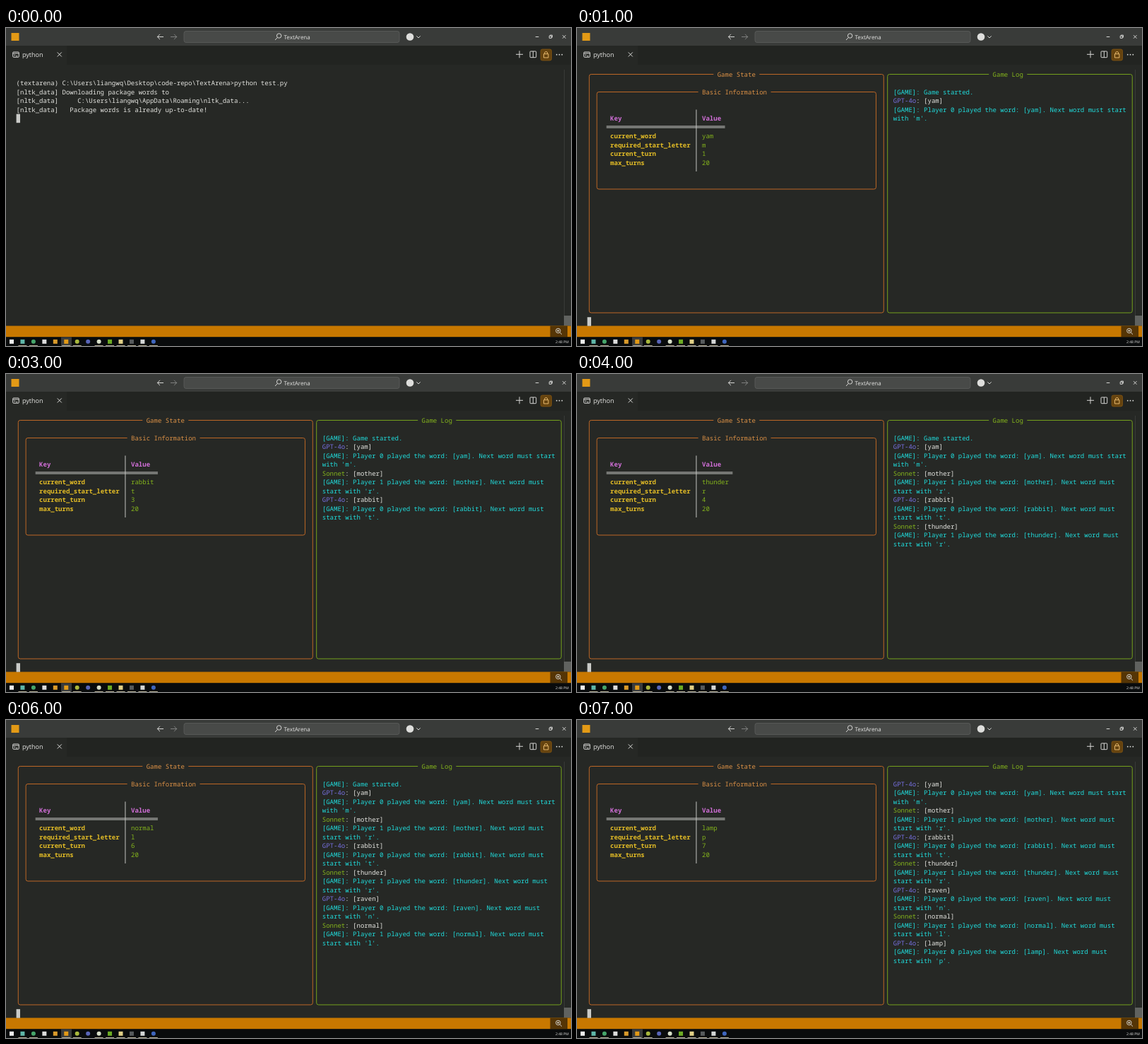
Recreate the animation shown at these times as an HTML page. Size 800 by 450 pixels, loop 8 s.

```html
<!DOCTYPE html>
<html lang="en">
<head>
<meta charset="utf-8">
<title>Word chain in a terminal</title>
<style>
  html, body { margin: 0; width: 100%; height: 100%; overflow: hidden; background: #262825; }
  svg { display: block; width: 800px; height: 450px; }
  text { white-space: pre; text-rendering: geometricPrecision; }
  .ui { font-family: "Open Sans", "Noto Sans", sans-serif; fill: #e6e6e4; }
  .term { font: 9.02px "Noto Sans Mono", "DejaVu Sans Mono", monospace; }
  .line { fill: none; stroke: #d6d6d4; stroke-width: 1; }
  .plain { fill: #e4e4e0; }
  .orange { fill: #dc9146; }
  .green { fill: #84b41c; }
  .cyan { fill: #20dcdc; font-weight: 500; }
  .violet { fill: #7770e2; }
  .key { fill: #e4bd26; font-weight: bold; }
  .head { fill: #d16fd8; font-weight: bold; }
  .rule { fill: none; stroke: #c4c5c2; stroke-width: 1; }
  .scene { visibility: hidden; animation: show 8s step-end infinite; }
  @keyframes show {
    0% { visibility: visible; }
    12.5%, 100% { visibility: hidden; }
  }
</style>
</head>
<body>
<svg viewBox="0 0 800 450" xmlns="http://www.w3.org/2000/svg">
  <rect width="800" height="450" fill="#262825"/>

  <!-- title bar -->
  <rect width="800" height="25" fill="#393b39"/>
  <rect x="7.5" y="7" width="11" height="11" fill="#e39a16"/>
  <path class="line" d="M223 12.5H214.5M218 8.8L214.3 12.5L218 16.2"/>
  <path class="line" stroke-opacity=".45" d="M233 12.5H241.5M238 8.8L241.7 12.5L238 16.2"/>
  <rect x="252" y="4.5" width="305" height="16" rx="3" fill="#484a48" stroke="#5d5f5d" stroke-width=".8"/>
  <path class="line" d="M381 17L384.3 13.5"/>
  <circle class="line" cx="386.6" cy="11" r="3.2"/>
  <text class="ui" x="393.5" y="15.6" font-size="8">TextArena</text>
  <circle cx="572" cy="12.5" r="5.3" fill="#dededc"/>
  <path class="line" d="M581.3 11.3L584 14L586.7 11.3"/>
  <g class="line" stroke-width=".8">
    <path d="M749.7 12.5H754.3M788 10.2L792.5 14.7M792.5 10.2L788 14.7"/>
    <path d="M769.2 11.2H772.3V14.3H769.2ZM770.3 11V10.1H773.4V13.2H772.5"/>
  </g>

  <!-- tab row -->
  <rect y="25" width="800" height="27" fill="#222421"/>
  <rect y="25" width="86" height="27" fill="#262825"/>
  <rect class="line" x="9.7" y="34" width="8.6" height="7.3" rx="1"/>
  <path class="line" stroke-width=".8" d="M10 36H18M11.6 37.4L12.9 38.5L11.6 39.6M14 39.7H16.4"/>
  <text class="ui" x="23" y="41.3" font-size="9">python</text>
  <path class="line" d="M72.7 34.4L78.8 40.5M78.8 34.4L72.7 40.5M722 37.3H732M727 32.3V42.3M746.3 33V41.7"/>
  <rect class="line" x="742" y="33" width="8.7" height="8.7" rx=".8"/>
  <rect x="757" y="30" width="15.5" height="16" rx="2.5" fill="#65430f" stroke="#8a5a12" stroke-width=".7"/>
  <path class="line" d="M761.4 36.7H767.9V42H761.4ZM762.7 36.5V35A2 2 0 0 1 766.6 35V36.5" style="stroke:#e8ba6e"/>
  <g fill="#dededc">
    <circle cx="779.7" cy="37.7" r=".9"/><circle cx="783.5" cy="37.7" r=".9"/><circle cx="787.3" cy="37.7" r=".9"/>
  </g>

  <!-- scroll bar and status bar -->
  <path d="M790.5 59V421" stroke="#393b38"/>
  <rect x="790" y="407" width="10" height="14.5" fill="#60625f"/>
  <rect y="421.5" width="800" height="16" fill="#c87800"/>
  <rect x="770.5" y="421.5" width="24.5" height="16" fill="#553505"/>
  <circle class="line" cx="781.8" cy="428.4" r="3.2"/>
  <path class="line" d="M784.2 430.8L787 433.6M780.2 428.4H783.4M781.8 426.8V430"/>

  <!-- taskbar -->
  <rect y="437.3" width="800" height="12.7" fill="#090b0c"/>
  <rect x="78" y="437.3" width="15" height="12.7" fill="#393b3c"/>
  <g id="dock"></g>
  <text class="ui" x="778" y="445.6" font-size="5">2:48 PM</text>

  <g id="screen" class="term"></g>
</svg>

<script>
const X0 = 14.6, Y0 = 65.5, CW = 5.415, RH = 12.5, LOG_COL = 80, LOG_WIDTH = 61, LOG_SIZE = 14;
const colX = c => X0 + c * CW;
const midX = c => colX(c + .5);
const rowY = r => Y0 + r * RH;

const esc = s => s.replace(/&/g, '&amp;').replace(/</g, '&lt;').replace(/>/g, '&gt;');
const put = (col, row, text, cls = 'plain') =>
  `<text class="${cls}" x="${colX(col)}" y="${rowY(row) + 3.1}">${esc(text)}</text>`;
const cursor = row =>
  `<rect x="${X0}" y="${rowY(row) - 6.3}" width="${CW}" height="${RH}" fill="#cacbc8"/>`;

// Rounded panel whose top edge opens around the title.
function panel(c1, c2, r1, r2, title, titleCol, stroke, cls) {
  const l = midX(c1), r = midX(c2), t = rowY(r1), b = rowY(r2), k = 2.8;
  const path = `M${colX(titleCol - 1)} ${t}H${l + k}Q${l} ${t} ${l} ${t + k}V${b - k}Q${l} ${b} ${l + k} ${b}` +
    `H${r - k}Q${r} ${b} ${r} ${b - k}V${t + k}Q${r} ${t} ${r - k} ${t}H${colX(titleCol + title.length + 1)}`;
  return `<path d="${path}" fill="none" stroke="${stroke}"/>` + put(titleCol, r1, title, cls);
}

function wrap(text) {
  const lines = [''];
  for (const word of text.split(' ')) {
    const last = lines[lines.length - 1];
    const next = last ? last + ' ' + word : word;
    if (next.length > LOG_WIDTH) lines.push(word);
    else lines[lines.length - 1] = next;
  }
  return lines;
}

const words = ['yam', 'mother', 'rabbit', 'thunder', 'raven', 'normal', 'lamp'];
const players = [['GPT-4o', 'violet'], ['Sonnet', 'green']];

function table(turn) {
  const word = words[turn - 1];
  const end = colX(31 + Math.max(5, word.length));
  const rows = [['current_word', word], ['required_start_letter', word.slice(-1)],
    ['current_turn', String(turn)], ['max_turns', '20']];
  return put(6, 5, 'Key', 'head') + put(30, 5, 'Value', 'head') +
    `<path class="rule" d="M${midX(28)} ${rowY(4)}V${rowY(11)}M${colX(5)} ${rowY(6) - 1.5}H${end}M${colX(5)} ${rowY(6) + .5}H${end}"/>` +
    rows.map(([k, v], i) => put(6, 7 + i, k, 'key') + put(30, 7 + i, v, 'green')).join('');
}

function gameLog(turn) {
  const entries = [{ text: '[GAME]: Game started.' }];
  words.slice(0, turn).forEach((word, i) => {
    entries.push({ player: players[i % 2], text: `: [${word}]` });
    entries.push({ text: `[GAME]: Player ${i % 2} played the word: [${word}]. Next word must start with '${word.slice(-1)}'.` });
  });
  let row = 2, out = '';
  for (const { player, text } of entries.slice(-LOG_SIZE)) {
    if (player) {
      const [name, cls] = player;
      out += put(LOG_COL, row, name, cls) + put(LOG_COL + name.length, row++, text);
    } else {
      for (const line of wrap(text)) out += put(LOG_COL, row++, line, 'cyan');
    }
  }
  return out;
}

const shell = () => [
  '(textarena) C:\\Users\\liangwq\\Desktop\\code-repo\\TextArena>python test.py',
  '[nltk_data] Downloading package words to',
  '[nltk_data]     C:\\Users\\liangwq\\AppData\\Roaming\\nltk_data...',
  '[nltk_data]   Package words is already up-to-date!'
].map((line, i) => put(0, i + 1, line)).join('') + cursor(5);

const game = turn =>
  panel(0, 77, 0, 27, 'Game State', 34, '#bd6726', 'orange') +
  panel(2, 75, 2, 13, 'Basic Information', 30, '#bd6726', 'orange') +
  panel(78, 142, 0, 27, 'Game Log', 106, '#74a01c', 'green') +
  table(turn) + gameLog(turn) + cursor(28);

document.getElementById('screen').innerHTML = [shell(), ...words.map((_, i) => game(i + 1))]
  .map((body, i) => `<g class="scene" style="animation-delay:${i - 8}s">${body}</g>`).join('');

// Taskbar: colour, round or square, running or not.
const apps = [
  ['#f0f0f0', 0, 0], ['#5fb6a8', 0, 1], ['#46a56a', 1, 1], ['#dcdcdc', 0, 0], ['#d99a2b', 0, 0],
  ['#e39a16', 0, 1], ['#a9b83c', 1, 1], ['#5965b8', 1, 0], ['#d8dfc8', 1, 1], ['#6dac24', 0, 1],
  ['#e0cf86', 0, 1], ['#565a5c', 0, 1], ['#d4d6d6', 0, 1], ['#3f66bd', 1, 1]
];
document.getElementById('dock').innerHTML = apps.map(([fill, round, running], i) => {
  const x = 8 + i * 15.45;
  return `<rect x="${x - 3}" y="440.8" width="6" height="6" rx="${round ? 3 : 0}" fill="${fill}"/>` +
    (running ? `<rect x="${x - 6}" y="449" width="12" height="1" fill="#b9b39a"/>` : '');
}).join('');
</script>
</body>
</html>
```
